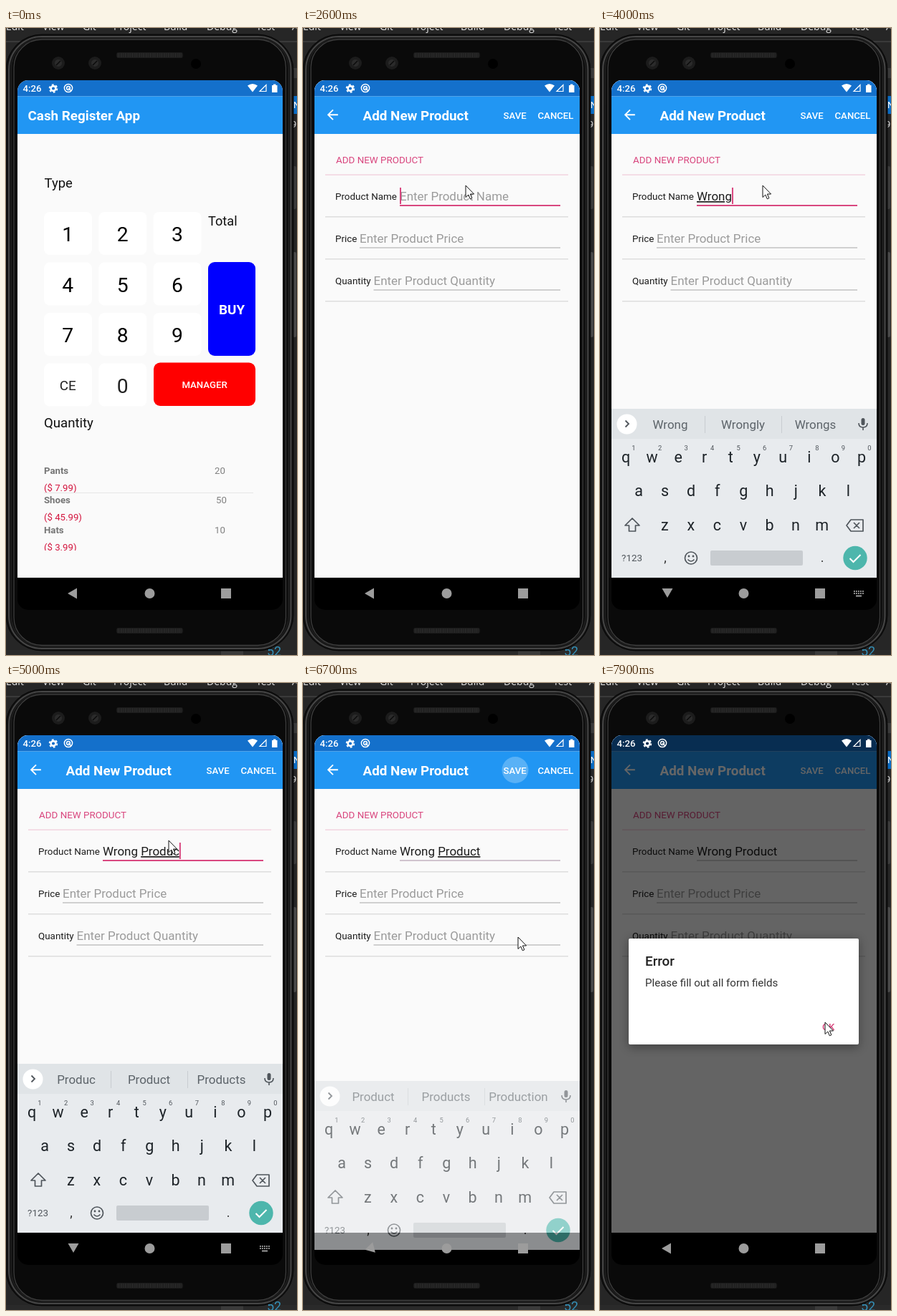
These frames come from a looping animation (406 px wide and 876 px high, 8 s). An HTML page:

```html
<!DOCTYPE html>
<html lang="en">
<head>
<meta charset="utf-8">
<title>Cash register</title>
<style>
html, body { margin: 0; width: 100%; height: 100%; overflow: hidden; background: #262626; }
svg { display: block; width: 100vw; height: 100vh; }
text { font-family: Roboto, sans-serif; font-size: 13.3px; white-space: pre; }
.m { font-weight: 500; }
.b { font-weight: 700; }
.c { text-anchor: middle; }
.ide { font-family: "Open Sans", sans-serif; font-size: 14px; fill: #e4e4e4; }
</style>
</head>
<body>
<svg id="stage" viewBox="0 0 406 876"></svg>
<script>
const LOOP = 8000, STEP = 100;
const PINK = '#d9477f', BLUE = '#2196f3', GREY = '#a8a8a8';

// Markup helpers
const rect = (x, y, w, h, fill, more = '') =>
  `<rect x="${x}" y="${y}" width="${w}" height="${h}" fill="${fill}" ${more}/>`;
const circle = (x, y, r, fill, more = '') => `<circle cx="${x}" cy="${y}" r="${r}" fill="${fill}" ${more}/>`;
const path = (d, fill, more = '') => `<path d="${d}" fill="${fill}" ${more}/>`;
const line = (d, color, w = 1, more = '') => path(d, 'none', `stroke="${color}" stroke-width="${w}" ${more}`);
const text = (s, x, y, size, fill, cls = '', more = '') =>
  `<text x="${x}" y="${y}" style="font-size:${size}px" fill="${fill}" class="${cls}" ${more}>${s}</text>`;
const group = (id, body, more = '') => `<g id="${id}" ${more}>${body}</g>`;

function ide() {
  const menu = [['Edit', 0], ['View', 51], ['Git', 107], ['Project', 150], ['Build', 220],
    ['Debug', 280], ['Test', 349], ['A', 399]];
  return rect(0, 0, 406, 876, '#262626') + rect(0, 18, 406, 2, '#3a3a3a')
    + menu.map(([s, x]) => `<text class="ide" x="${x}" y="3">${s}</text>`).join('')
    + rect(400, 56, 6, 14, '#3a3a3a') + rect(400, 95, 6, 25, '#0a6cc4')
    + text('N', 401, 112, 13, '#fff') + text('9', 398, 139, 13, '#ddd')
    + rect(0, 869, 406, 7, '#2a2a2a') + rect(300, 870, 31, 6, '#3b3b3b')
    + text('52', 364, 877, 18, '#3490b8', '', 'font-family="Noto Sans Mono"');
}

function phone() {
  const grille = y => rect(154, y, 93, 8, '#1b1b1b', 'rx="3"')
    + line(`M156 ${y + 4}H245`, '#303030', 6, 'stroke-dasharray="1 1.5"');
  const sensor = x => circle(x, 49, 9, '#1c1c1c') + circle(x, 49, 5, '#2b2b2b')
    + line(`M${x - 3} 52l6-6`, '#0a0a0a', 1.5);
  return rect(400, 193, 5, 60, '#3c3c3c', 'rx="2"') + rect(400, 313, 5, 119, '#4a4a4a', 'rx="2"')
    + rect(0, 9, 401, 861, '#101010', 'rx="50" stroke="#080808"')
    + rect(4, 12, 393.5, 855, '#161616', 'rx="46" stroke="#464646" stroke-width="2"')
    + rect(7.5, 14, 386.5, 850, '#090909', 'rx="43" stroke="#1c1c1c" stroke-width="2"')
    + rect(11, 16, 379.5, 846.5, '#0a0a0a', 'rx="39" stroke="#3e3e3e" stroke-width="1.3"')
    + grille(34) + grille(838) + sensor(73) + sensor(124) + circle(265, 50, 7, '#000');
}

const ARROW = path('M20 11H7.83l5.59-5.59L12 4l-8 8 8 8 1.41-1.41L7.83 13H20z', '#fff',
  'transform="translate(30 110) scale(.942)"');

const page = (id, title, back, body) => group(id,
  rect(16, 73, 370, 695, '#fafafa') + rect(16, 73, 370, 22.5, '#1470cb') + rect(16, 95.5, 370, 52.5, BLUE)
  + (back ? ARROW : '') + text(title, back ? 83.5 : 30.5, 129, 18.84, '#fff', 'b') + body);

function register() {
  let body = text('Type', 53.5, 223, 18.5, '#111') + text('Total', 282, 276, 18.2, '#111')
    + text('Quantity', 53, 558, 18.6, '#111');
  ['1', '2', '3', '4', '5', '6', '7', '8', '9', 'CE', '0'].forEach((s, i) => {
    const x = 53 + 76.3 * (i % 3), y = 257 + 70.5 * (i / 3 | 0), word = s === 'CE';
    body += rect(x, y, 67, 60, '#fff', 'rx="8"')
      + text(s, x + 33.3, y + (word ? 37 : 41), word ? 18.84 : 28.26, i > 8 ? '#222' : '#000', 'c');
  });
  body += rect(282, 327, 66, 131, '#0000ff', 'rx="9"') + text('BUY', 315, 400, 18.84, '#fff', 'b c')
    + rect(206, 467.5, 142, 60.5, '#ff0000', 'rx="9"')
    + group('managerPress', rect(206, 467.5, 142, 60.5, '#000', 'rx="9"'))
    + text('MANAGER', 277, 502.5, 13.19, '#fff', 'm c');
  const rows = [['Pants', '20', '7.99', 291], ['Shoes', '50', '45.99', 293], ['Hats', '10', '3.99', 291]];
  body += `<g clip-path="url(#list)">` + rows.map(([name, n, price, x], i) => {
    const y = 622.5 + 41.8 * i;
    return text(name, 53, y, 13.19, '#757575', 'b') + text(n, x, y, 13.19, '#808080')
      + text(`($ ${price})`, 53, y + 24, 13.19, '#d3163f');
  }).join('') + line('M53 649.5H345', '#e6e6e6') + '</g>';
  return page('register', 'Cash Register App', false, body);
}

function manager() {
  const buttons = ['HISTORY', 'RESTOCK', 'ADD NEW PRODUCT'].map((s, i) => {
    const y = 389 + 51 * i;
    return rect(131.5, y + 1, 138, 35.5, '#000', 'rx="2" opacity=".15"') + rect(132, y, 137, 35, '#d6d7d7', 'rx="2"')
      + (i === 2 ? group('addPress', rect(132, y, 137, 35, '#888', 'rx="2"')) : '')
      + text(s, 200.5, y + 22.2, 13.19, '#222', 'm c');
  });
  return page('manager', 'Manager Panel', true, buttons.join(''));
}

function form() {
  const field = (label, hint, x, y, id) => text(label, 45, y - 1, 13.4, '#1c1c1c')
    + text(hint, x, y, 16.96, '#9b9b9b', '', `id="${id}Hint"`)
    + line(`M${x} ${y + 7}H359`, GREY, 1.2, `id="${id}Line"`) + rect(31, y + 22, 339, 1.5, '#dedede');
  return page('form', 'Add New Product', true,
    circle(296, 121.5, 18.5, '#fff', 'id="saveRipple"')
    + text('SAVE', 279.5, 126.7, 13.19, '#fff', 'm') + text('CANCEL', 327.5, 126.7, 13.19, '#fff', 'm')
    + text('ADD NEW PRODUCT', 46, 189, 13.4, PINK) + rect(31, 204.5, 339, 1.2, '#f2cbd9')
    + field('Product Name', 'Enter Product Name', 135, 241, 'name')
    + field('Price', 'Enter Product Price', 79, 300, 'price')
    + field('Quantity', 'Enter Product Quantity', 98.5, 359, 'qty')
    + text('<tspan id="done"></tspan><tspan id="word"></tspan>', 135, 241, 16.96, '#1c1c1c', '', 'id="typed"')
    + rect(135, 223, 2, 23, PINK, 'id="caret"'));
}

function keyboard() {
  const INK = '#4f555b', out = w => `stroke="${INK}" stroke-width="${w}" stroke-linejoin="round"`;
  let keys = '';
  [['qwertyuiop', 36, 606.5], ['asdfghjkl', 54, 654], ['zxcvbnm', 90.3, 701.5]].forEach(([row, x0, y], r) => {
    [...row].forEach((ch, i) => {
      const x = x0 + 36.55 * i;
      keys += text(ch, x, y, 21.5, '#1d2328', 'c', 'data-key="1"');
      if (!r) keys += text((i + 1) % 10, x + 11, 590, 9.4, INK, 'c');
    });
  });
  const mic = rect(364.5, 545, 5, 10, INK, 'rx="2.5"') + line('M361 552q0 6 6 6t6-6M367 558v4', INK, 1.6);
  const tools = line('M40 548.5l-4.5 4.5 4.5 4.5', INK, 1.8)
    + circle(85, 551, 5, 'none', out(2)) + line('M89 555l6 6', INK, 2.2)
    + path('M133 546h14v9l-5 5h-9zM147 555h-5v5', 'none', out(1.6)) + line('M136 553q3 4 6 0M137 549v1M142 549v1', INK, 1.4)
    + text('GIF', 193, 557.5, 12.5, INK, 'b c') + rect(241, 546, 15, 15, '#777d83')
    + rect(281, 543, 1, 21, '#c8ccd0') + [308.5, 314.5, 320.5].map(x => circle(x, 554, 2, INK)).join('');
  const words = line('M35.5 548.5l4.5 4.5-4.5 4.5', INK, 1.8) + rect(146, 542, 1, 24, '#c8ccd0') + rect(253, 542, 1, 24, '#c8ccd0')
    + [98, 199.5, 300.5].map(x => text('', x, 560, 16.96, '#5c6369', 'c', 'data-word="1"')).join('');
  return group('kb', rect(16, 532, 370, 236, '#e8ebee') + rect(16, 532, 370, 42, '#e0e4e7')
    + circle(37.5, 553.5, 14, '#fff') + group('tools', tools) + group('words', words) + mic + keys
    + path('M45 685l10 10h-5.5v8h-9v-8H35z', INK, `id="shift" ${out(1.7)}`)
    + path('M344 695l6-8h17v16h-17zM354 691l8 8M362 691l-8 8', 'none', out(1.7))
    + text('?123', 44.5, 745, 13.4, INK, 'c') + text(',', 91, 746, 18, '#333', 'c') + text('.', 310, 746, 18, '#333', 'c')
    + circle(127, 740.5, 8.5, 'none', out(1.7)) + circle(124, 738, 1.4, INK) + circle(130, 738, 1.4, INK)
    + line('M122.5 742.5q4.5 5 9 0', INK, 1.6) + rect(154, 730, 129, 21, '#c8ccd0', 'rx="2"')
    + circle(356, 740.5, 16.7, '#4db6ac') + line('M348.5 741l5 5 10-10', '#fff', 2));
}

function status() {
  const cx = 66, cy = 84.5;
  return text('4:26', 23.5, 89.2, 13.19, '#fff', 'm')
    + circle(cx, cy, 3.4, 'none', 'stroke="#fff" stroke-width="2.6"')
    + circle(cx, cy, 5.4, 'none', 'stroke="#fff" stroke-width="1.8" stroke-dasharray="2.8 2.85"')
    + circle(87, 84, 5.6, 'none', 'stroke="#fff" stroke-width="1.5"') + circle(87, 84, 2.4, 'none', 'stroke="#fff" stroke-width="1.5"')
    + line('M87 84l4 4', '#fff', 1.5)
    + path('M337 80.5q7-5 14 0l-7 9z', '#fff') + path('M354 88.5h9v-9z', 'none', 'stroke="#fff" stroke-width="1.2"')
    + path('M371 80h2v-1.5h3.5v1.5h2v10h-7.5z', '#fff');
}

const nav = () => group('back', path('M86 790l13-7.5v15z', '#9c9c9c'))
  + circle(200.5, 790, 7, '#9c9c9c') + rect(300, 783, 14, 14, '#9c9c9c')
  + group('switcher', line('M354 787h14M354 790h14', '#9c9c9c', 1.8, 'stroke-dasharray="1.8 1.2"') + line('M357 793.5h8', '#9c9c9c', 1.8));

const dialog = () => group('dialog',
  rect(40, 359, 321, 150, '#000', 'rx="3" opacity=".35" filter="url(#soft)"') + rect(40, 357, 321, 148, '#fff', 'rx="2"')
  + text('Error', 63, 394.5, 18.84, '#222', 'm') + text('Please fill out all form fields', 63, 423.5, 15.07, '#333')
  + text('OK', 310, 484.5, 13.19, PINK, 'm'));

const stage = document.getElementById('stage');
stage.innerHTML = `<defs>
  <clipPath id="screen">${rect(16, 73, 370, 740, '#000', 'rx="15"')}</clipPath>
  <clipPath id="list">${rect(50, 605, 300, 125, '#000')}</clipPath>
  <filter id="soft" x="-20%" y="-20%" width="140%" height="140%"><feGaussianBlur stdDeviation="7"/></filter></defs>`
  + ide() + phone()
  + `<g clip-path="url(#screen)">` + register() + manager() + form()
  + rect(16, 73, 370, 695, '#000', 'id="scrim"') + dialog() + status()
  + rect(16, 768, 370, 45, '#000') + keyboard() + nav() + '</g>'
  + group('mouse', path('M0 0V16.5L3.8 13 6.3 18.8 8.9 17.7 6.4 12H11.6Z', '#fff', 'stroke="#111" stroke-width="1"'));

const $ = id => document.getElementById(id);
const keyCaps = [...document.querySelectorAll('[data-key]')].map(node => ({ node, ch: node.textContent }));
const wordSlots = [...document.querySelectorAll('[data-word]')];

// Timeline
const MOUSE = [[100, 330, 850], [200, 300, 640], [300, 272, 500], [600, 272, 500], [900, 223, 525],
  [1200, 214, 508], [1700, 214, 508], [2200, 227, 220], [5700, 227, 220], [6300, 297, 122], [6500, 297, 122],
  [6700, 300, 355], [7000, 303, 370], [7400, 309, 400], [7900, 314, 474]];
const PHRASE = 'Wrong Product';
const KEY_TIMES = [3400, 3600, 3700, 3900, 4000, 4200, 4400, 4500, 4800, 4800, 4900, 5000, 5200];
const GUESSES = ['', 'W We Will', 'Wr Write Wrong', 'Wro Wrong Wrote', 'Wron Wrong Wrongs', 'Wrong Wrongly Wrongs',
  'number one place', 'P Please Put', 'Pr Pretty Price', 'Pro Problem Project', 'Prod Product Produce',
  'Produ Product Produce', 'Produc Product Products', 'Product Products Production'];

const ramp = (t, a, b) => Math.min(1, Math.max(0, (t - a) / (b - a)));
const set = (id, name, value) => $(id).setAttribute(name, value);
const fade = (id, a) => { set(id, 'opacity', a); set(id, 'display', a > 0 ? 'inline' : 'none'); };

function mouseAt(t) {
  const i = MOUSE.findIndex(p => p[0] >= t);
  if (i < 1) return MOUSE[0].slice(1);
  const [t0, x0, y0] = MOUSE[i - 1], [t1, x1, y1] = MOUSE[i], k = ramp(t, t0, t1);
  return [x0 + (x1 - x0) * k, y0 + (y1 - y0) * k];
}

function enter(id, t, start) {
  const k = ramp(t, start, start + 300), ease = 1 - (1 - k) ** 3;
  fade(id, ease);
  set(id, 'transform', `translate(0 ${30 * (1 - ease)})`);
}

function type(t) {
  const n = KEY_TIMES.filter(k => k <= t).length, typed = PHRASE.slice(0, n);
  const cut = typed.lastIndexOf(' ') + 1, focused = t >= 2500 && t < 6600;
  $('done').textContent = typed.slice(0, cut);
  $('word').textContent = typed.slice(cut);
  $('word').style.textDecoration = t < 6800 ? 'underline' : 'none';
  fade('nameHint', n ? 0 : 1);
  const last = n ? KEY_TIMES[n - 1] : 2500;
  fade('caret', focused && (t - last) % 1000 < 500 ? 1 : 0);
  set('caret', 'x', 135 + (n ? $('typed').getComputedTextLength() : 0));
  set('nameLine', 'stroke', focused ? PINK : t >= 6600 && t < 6800 ? '#a78fa3' : GREY);
  set('nameLine', 'stroke-width', focused ? 1.8 : 1.2);

  fade('tools', n ? 0 : 1);
  fade('words', n ? 1 : 0);
  const guesses = GUESSES[n].split(' ');
  wordSlots.forEach((slot, i) => slot.textContent = guesses[i] || '');
  keyCaps.forEach(({ node, ch }) => node.textContent = n ? ch : ch.toUpperCase());
  set('shift', 'fill', n ? 'none' : '#4f555b');
}

function draw(t) {
  enter('manager', t, 600);
  enter('form', t, 1500);
  fade('managerPress', t >= 500 && t < 800 ? 0.15 : 0);
  fade('addPress', t >= 1400 && t < 1800 ? 0.35 : 0);
  type(t);

  const opened = ramp(t, 2650, 2900);
  const shown = t < 6800 ? opened * (1 - 0.8 * ramp(t, 6600, 6800)) : 0;
  fade('kb', shown);
  set('kb', 'transform', `translate(0 ${(1 - shown) * 60})`);
  const turn = t < 6600 ? opened : 0.16 * (t < 6800);
  set('back', 'transform', `rotate(${-90 * turn} 93 789)`);
  fade('switcher', t >= 2900 && t < 6600 ? 1 : 0);

  fade('saveRipple', t >= 6500 ? 0.25 * (1 - ramp(t, 6700, 7000)) : 0);
  const pop = ramp(t, 6800, 7100);
  fade('scrim', 0.6 * pop);
  fade('dialog', pop);

  const [x, y] = mouseAt(t);
  fade('mouse', t >= 100 ? 1 : 0);
  set('mouse', 'transform', `translate(${x} ${y})`);
}

const start = performance.now();
function tick() {
  const t = (performance.now() - start) % LOOP;
  draw(Math.floor(t / STEP) * STEP);
  requestAnimationFrame(tick);
}
tick();
</script>
</body>
</html>
```
